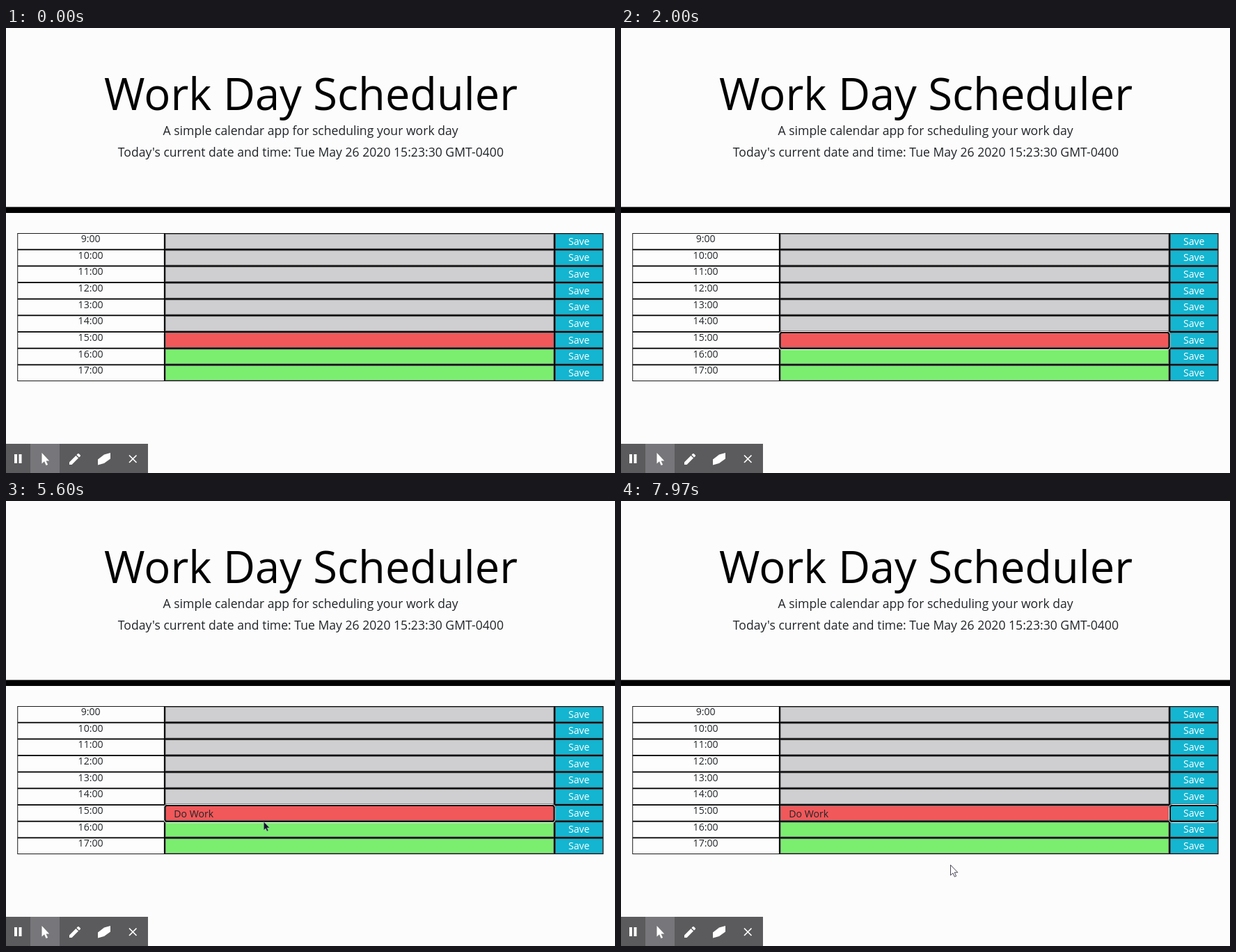
An HTML page that plays this animation: 875x640 px, repeating every 8000 ms.

```html
<!DOCTYPE html>
<html lang="en">
<head>
<meta charset="utf-8">
<title>Work Day Scheduler</title>
<style>
html, body { margin: 0; width: 100%; height: 100%; overflow: hidden; background: #fcfcfc; }
svg { display: block; width: 875px; height: 640px; font-family: "Open Sans", sans-serif; font-size: 14.1px; }
.mid { text-anchor: middle; }
.ink { fill: #212529; }
.lead { font-size: 17.6px; }
.ring { fill: none; stroke: #101010; stroke-width: 2; }
.halo { fill: none; stroke: #fff; stroke-width: 1; }
</style>
</head>
<body>
<svg viewBox="0 0 875 640">
  <rect width="875" height="640" fill="#fcfcfc"/>
  <text class="mid" x="438.1" y="118" font-size="63.2">Work Day Scheduler</text>
  <text class="mid ink lead" x="437.6" y="153.7">A simple calendar app for scheduling your work day</text>
  <text class="mid ink lead" x="437.9" y="184.8">Today's current date and time: Tue May 26 2020 15:23:30 GMT-0400</text>
  <rect y="257.4" width="875" height="8.6"/>
  <g id="table"></g>

  <text id="note" class="ink" x="241.3" y="455" xml:space="preserve"></text>
  <rect id="caret" y="441" width="1" height="17" fill="#1c1010"/>
  <g id="fieldFocus">
    <rect class="halo" x="227" y="436.5" width="562" height="26" rx="4"/>
    <rect class="ring" x="228.5" y="438" width="559" height="23" rx="3"/>
  </g>
  <g id="buttonFocus">
    <rect class="halo" x="787.5" y="436.5" width="71" height="26" rx="4"/>
    <rect class="ring" x="789" y="438" width="68.5" height="23" rx="3"/>
  </g>

  <g id="toolbar">
    <rect y="598" width="204" height="42" fill="#5b5a5c"/>
    <rect x="35" y="598" width="42" height="42" fill="#77767a"/>
    <g fill="#fff">
      <path d="M12 613h4v13h-4zM18.500 613h4v13h-4z"/>
      <path d="M51.500 611v15.500l3.500-3.200 2.600 5.700 2.500-1.100-2.600-5.500h4.700z"/>
      <path d="M91 628v-3.600l9.400-9.400 3.600 3.600-9.400 9.400zM101.400 614l1.700-1.700q.8-.8 1.600 0l2 2q.8.8 0 1.600l-1.700 1.700z"/>
      <path d="M132 620.500l9-7 9-2.500v8.500l-9 6.500-9 2.500z"/>
    </g>
    <path d="M177 614.500l10.500 10.500M187.500 614.500l-10.500 10.500" stroke="#fff" stroke-width="1.700"/>
  </g>

  <path id="arrow" d="M.5.500v14.800l3.400-3.200 2.400 5.300 2.300-1-2.400-5.200h4.600z" stroke-linejoin="round"/>
  <path id="hand" d="M0 2q0-1.700 1.400-1.700T2.800 2v6l1-.7 1.700.5 1 .5 1.400.2.900.8 1.200.3.700 1.300v4.100l-1.200 3v2.500H1.300v-1.900l-3.200-4.300-2.200-3q-.6-1.500.7-1.900 1.200-.2 2.300 1.300L0 12z" fill="#fff" stroke="#333" stroke-width=".8"/>
</svg>
<script>
const LOOP = 8000, BLINK = 530;
const FOCUS = 1000, CLICK = 6400, HOVER = 6070, LEAVE = 7740;
const NOTE = "Do Work";
const KEYS = [2200, 2570, 2750, 3230, 3600, 3830, 4000];
const START = [370, 461], SAVE = [809.5, 449], END = [473, 523];
const GRAY = "#cfcfd1", RED = "#f1585a", GREEN = "#7bee70", BLUE = "#13b5d0";
const LEFT = 16.3, FIELD = 227.8, BUTTON = 788.2, RIGHT = 858.5;
const TOP = 295, PITCH = 23.67, ROWS = 9;

const $ = id => document.getElementById(id);
const table = $("table");
const [note, caret, arrow, hand] = ["note", "caret", "arrow", "hand"].map($);

function add(tag, attrs, text) {
  const el = document.createElementNS("http://www.w3.org/2000/svg", tag);
  for (const key in attrs) el.setAttribute(key, attrs[key]);
  if (text) el.textContent = text;
  return table.appendChild(el);
}

// A filled cell between two x positions, inset from its row on every side
function cell(left, right, y, inset, fill) {
  add("rect", {
    x: left + inset, y: y + inset, fill,
    width: right - left - 2 * inset, height: PITCH - 2 * inset
  });
}

const labels = [];
add("rect", { x: LEFT, y: TOP, width: RIGHT - LEFT, height: PITCH * ROWS });
for (let i = 0; i < ROWS; i++) {
  const hour = 9 + i, y = TOP + PITCH * i;
  const color = hour < 15 ? GRAY : hour === 15 ? RED : GREEN;
  cell(LEFT, FIELD, y, 0.9, "#fdfdfd");
  cell(FIELD, BUTTON, y, 0.9, "#6c6c70");
  cell(FIELD, BUTTON, y, 1.8, color);
  cell(BUTTON, RIGHT, y, 0.9, "#4a6f7c");
  cell(BUTTON, RIGHT, y, 1.8, BLUE);
  add("text", { x: 121.6, y: y + 13, class: "mid ink" }, hour + ":00");
  labels.push(add("text", { x: 823.2, y: y + 16.8, class: "mid", fill: "#fff" }, "Save"));
}
const hovered = labels[6];

const show = (el, on) => el.setAttribute("visibility", on ? "visible" : "hidden");
const ease = p => p * p * (3 - 2 * p);

function move(a, b, from, to, t) {
  const p = ease(Math.min(1, Math.max(0, (t - from) / (to - from))));
  return a.map((v, i) => v + (b[i] - v) * p);
}

function draw(t) {
  const count = KEYS.filter(k => k <= t).length;
  const typed = NOTE.slice(0, count);
  if (note.textContent !== typed) note.textContent = typed;

  const editing = t >= FOCUS && t < CLICK;
  const since = t - (count ? KEYS[count - 1] : FOCUS);
  const lit = Math.floor(since / BLINK) % 2 === 0;
  show(caret, editing && t < 6330 && lit);
  caret.setAttribute("x", Math.round(241 + (count ? note.getComputedTextLength() : 0)));
  show($("fieldFocus"), editing);
  show($("buttonFocus"), t >= CLICK);

  const hover = t >= HOVER && t < LEAVE;
  hovered.setAttribute("font-size", hover ? 15.7 : 14.1);

  const [x, y] = t < LEAVE
    ? move(START, SAVE, 5830, 6130, t)
    : move(SAVE, END, 7720, 7970, t);
  const resting = t < 5830;
  show(arrow, t >= 3300 && !hover);
  show(hand, hover);
  arrow.setAttribute("transform", `translate(${x} ${y}) scale(${resting ? 0.8 : 1})`);
  arrow.setAttribute("fill", resting ? "#16122c" : "#fff");
  arrow.setAttribute("stroke", resting ? "#b9b6d8" : "#333344");
  arrow.setAttribute("stroke-width", resting ? 0.5 : 0.9);
  hand.setAttribute("transform", `translate(${x - 1} ${y})`);
}

const began = performance.now();
function tick() {
  draw((performance.now() - began) % LOOP);
  requestAnimationFrame(tick);
}
tick();
</script>
</body>
</html>
```
